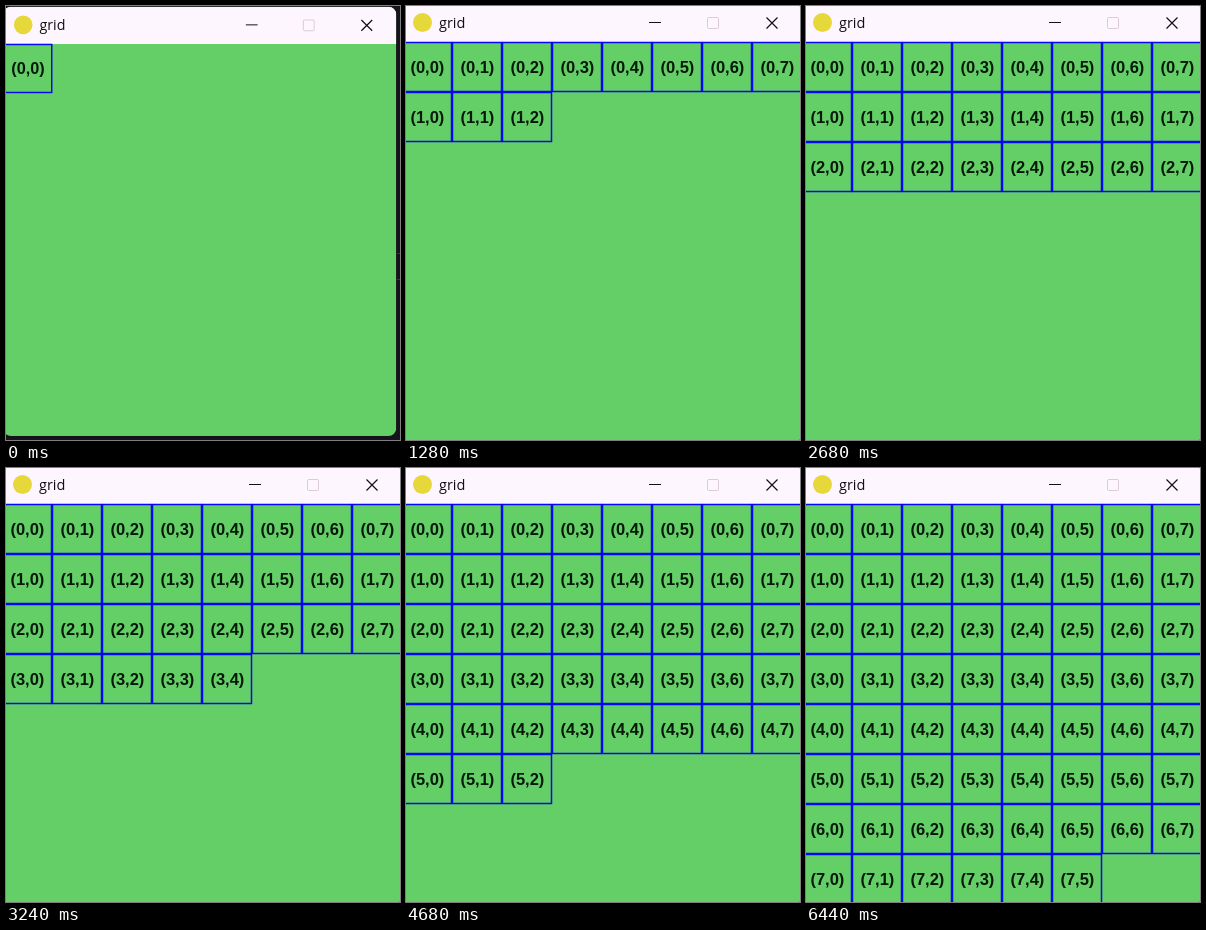
Recreate the animation shown at these times as an HTML page. Size 394x434 px, loop 6.48 s.

```html
<!DOCTYPE html>
<html lang="en">
<head>
<meta charset="utf-8">
<title>grid</title>
<style>
  html, body { margin: 0; width: 394px; height: 434px; overflow: hidden; background: #17131c; }
  svg { display: block; }
  .title { font: 14.5px "Open Sans", "Noto Sans", sans-serif; fill: #111; }
  .cell rect { fill: none; stroke: #0606f0; stroke-width: 1.5; }
  .cell text { font: bold 16.5px "Liberation Sans", Arial, sans-serif; text-anchor: middle; fill: #06180a; }
</style>
</head>
<body>
<svg width="394" height="434" viewBox="0 0 394 434">
  <path d="M391 247.500h3M391 273.500h3" stroke="#3a343e"/>
  <g id="win">
    <clipPath id="frame"><rect x="-4" y="-2" width="400" height="438" rx="8"/></clipPath>
    <g clip-path="url(#frame)">
      <rect x="-4" y="-2" width="400" height="438" fill="#64cf66"/>
      <rect x="-4" y="-2" width="400" height="38" fill="#fef6fe"/>
      <circle cx="16.500" cy="16.500" r="9.500" fill="#e6d83a"/>
      <text class="title" x="33" y="22">grid</text>
      <path d="M243 16.500h12" stroke="#111"/>
      <rect x="301.500" y="11.500" width="11" height="11" rx="1" fill="none" stroke="#dccad6"/>
      <path d="M360.500 11.500l11 11m0-11l-11 11" stroke="#111" stroke-width="1.200"/>
      <g id="cells"></g>
    </g>
  </g>
</svg>
<script>
  const LOOP = 6480, STEP = 40, SIZE = 50, COLS = 8;
  const NS = "http://www.w3.org/2000/svg";
  const win = document.getElementById("win");
  const grid = document.getElementById("cells");

  // [time in ms, cells drawn]; the pace varies slightly between points
  const pace = [[0, 1], [120, 1], [1280, 11.5], [2680, 24.4], [3920, 35.5],
                [4680, 43.4], [5280, 50.3], [6440, 62.3], [6480, 62.7]];

  function add(parent, tag, attrs) {
    const el = document.createElementNS(NS, tag);
    for (const key in attrs) el.setAttribute(key, attrs[key]);
    return parent.appendChild(el);
  }

  function makeCell(row, col) {
    const x = col * SIZE - 4, y = row * SIZE + 36;
    const cell = add(grid, "g", { class: "cell" });
    add(cell, "rect", { x: x + 0.5, y: y + 0.5, width: SIZE - 1, height: SIZE - 1 });
    add(cell, "text", { x: x + 25.4, y: y + 30.6 }).textContent = `(${row},${col})`;
    return cell;
  }

  const cells = Array.from({ length: COLS * COLS },
    (_, i) => makeCell(Math.floor(i / COLS), i % COLS));

  function countAt(t) {
    const i = pace.findIndex(p => p[0] > t);
    const [t0, n0] = pace[i - 1], [t1, n1] = pace[i];
    return Math.floor(n0 + (n1 - n0) * (t - t0) / (t1 - t0));
  }

  function draw(now) {
    const t = Math.floor(now % LOOP / STEP) * STEP;
    const count = countAt(t);
    cells.forEach((cell, i) => cell.style.display = i < count ? "" : "none");

    // the window eases open to full size
    const k = Math.max(0, 1 - t / 120) ** 2;
    win.setAttribute("transform",
      `matrix(${1 - 0.017 * k} 0 0 ${1 - 0.02 * k} ${k} ${2.7 * k})`);
  }

  const start = performance.now();
  function tick() {
    draw(performance.now() - start);
    requestAnimationFrame(tick);
  }
  tick();
</script>
</body>
</html>
```
